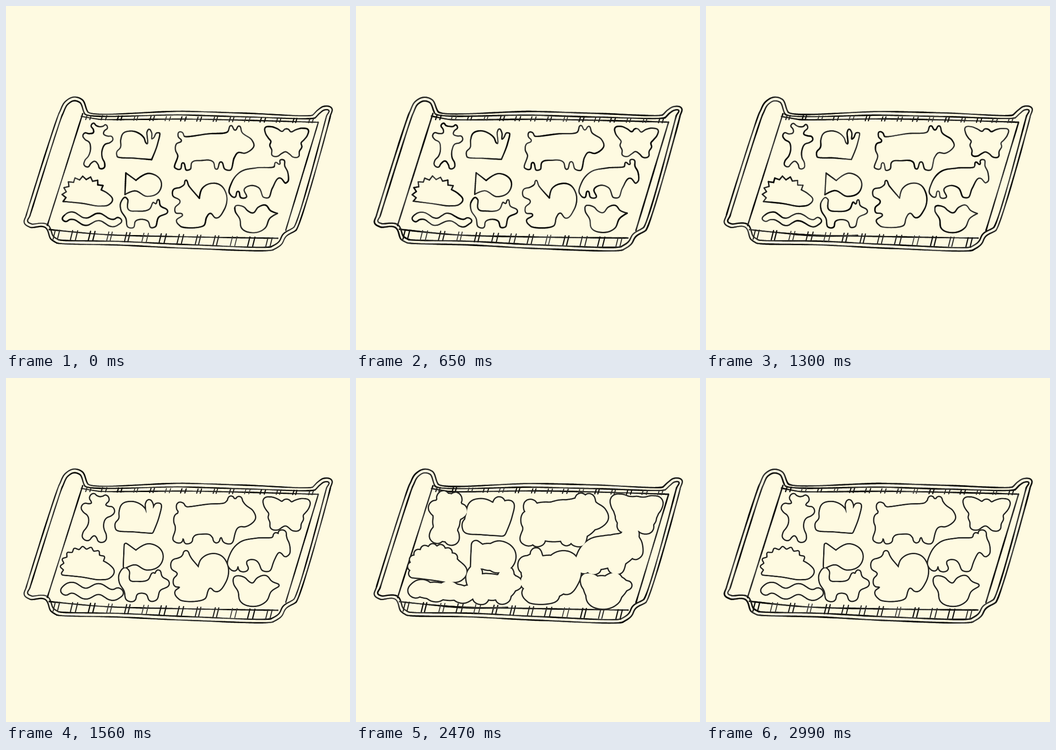
These frames come from a looping animation (749x748 px, 3120 ms). An HTML page with a canvas:

```html
<!DOCTYPE html>
<html lang="en">
<head>
<meta charset="utf-8">
<title>Biscuit tray</title>
<style>
html, body { margin: 0; width: 100%; height: 100%; overflow: hidden; background: #fefae1; }
canvas { display: block; width: 749px; height: 748px; }
</style>
</head>
<body>
<canvas id="stage" width="749" height="748"></canvas>
<script>
const ctx = document.getElementById('stage').getContext('2d');
const PAPER = '#fefae1', INK = '#252523', STEP = 130, STEPS = 24;

// Key points are "x,y"; a trailing "!" marks a sharp corner.
const parse = text => text.split(' ').map(s => {
  const [x, y] = s.split(',').map(parseFloat);
  return { x, y, sharp: s.endsWith('!') };
});

// Half an outline, mirrored about an axis through (cx, cy).
function mirror(cx, cy, tilt, half) {
  const c = Math.cos(tilt), s = Math.sin(tilt);
  const place = side => ({ x, y }) => ({ x: cx + side * x * c - y * s, y: cy + side * x * s + y * c });
  const pts = parse(half);
  return [...pts.map(place(1)), ...pts.slice(1, -1).reverse().map(place(-1))];
}

function hedgehog() {
  const spikes = Array.from({ length: 18 }, (_, i) => {
    const a = Math.PI * (0.9 + i * 0.058), r = i % 2 ? 0.83 : 1;
    return { x: 170 + 48 * r * Math.cos(a), y: 412 + 42 * r * Math.sin(a), sharp: true };
  });
  return [...spikes, ...parse('222,408 232,422 224,432 205,435 165,429')];
}

function worm() {
  const side = dy => Array.from({ length: 13 }, (_, i) => {
    const x = 130 + i * 9.5;
    return { x, y: 464 - 6 * Math.cos((x - 144) * 0.108) + (x - 190) * 0.05 + dy };
  });
  return [...side(-8), { x: 252, y: 467 }, ...side(8).reverse(), { x: 123, y: 464 }];
}

const biscuits = [
  mirror(198, 302, 0.13, '0,-40 8,-42 13,-46 18,-40 12,-32 11,-26 20,-22 30,-22 33,-16 28,-9 17,-3 13,8 15,26 22,38 22,47 13,50 8,42 0,36'),
  mirror(610, 290, 0.05, '0,-23 4,-22 9,-17 20,-22 35,-26 47,-23 46,-12 38,0 33,6 35,14 30,25 29,36 18,38 8,31 0,27'),
  hedgehog(),
  worm(),
  // rabbit, pig, fish
  parse('306,299 300,286 288,276 270,272 255,277 250,290 249,308 241,318 242,327 280,331 317,334! 330,300 334,276 328,276 322,286 318,289 317,275 311,268 307,274'),
  parse('388,283 384,275 377,274 375,284 382,293 371,300 369,313 374,325 368,352 379,355 385,341 393,357 401,355 405,340 425,336 451,339 458,355 468,339 477,355 488,357 497,330 505,319 520,320 540,303 535,291 514,275 507,261 499,270 490,260 483,273 440,278'),
  parse('261,363! 283,379! 312,364 338,383 333,404 308,414 280,402 259,410!'),
  // fox, squirrel
  parse('584,349 545,352 510,361 491,385 487,408 498,416 505,403 512,417 523,416 519,398 530,391 550,395 561,416 571,417 580,396 597,374 609,385 614,381 613,360 607,348 605,335 597,335 596,344 587,340'),
  parse('388,388 391,379 398,391 421,418! 427,397 445,386 466,389 479,407 475,443 457,461 444,451 437,459 432,476 380,479 371,467 384,453 369,449 368,439 379,425 363,412 364,400 380,394'),
  // dog, bird
  parse('250,427 260,416 265,421 267,443 285,446 313,441 321,427 326,430 331,421 336,434 352,446 332,460 325,480 316,482 309,468 282,468 277,482 266,481 261,462 250,443'),
  parse('499,436 518,437 526,445 537,450 550,437 565,433 576,445 591,451! 575,461 564,483 537,493 513,483 509,463 499,446')
];

const rim = parse('178,230 390,229 520,233 668,237 679,226 693,218 709,222 706,240 631,488 609,502 600,518 582,530 400,527 250,520 110,515 98,507 86,482 52,481 40,472 44,455 116,232 130,207 148,198 165,203');
const floorLines = ['164,240 200,246 400,246 680,253', '94,486 200,496 400,502 592,505', '167,234 90,477', '680,253 609,488'].map(parse);

// Small redraw differences between the three hand drawings.
const wobble = (pts, k) => pts.map((p, i) => ({
  x: p.x + (k && Math.sin(i * 12.9 + k * 7.3)) * 0.6,
  y: p.y + (k && Math.sin(i * 8.1 + k * 4.7 + 2)) * 0.6,
  sharp: p.sharp
}));

const gap = (a, b) => Math.hypot(b.x - a.x, b.y - a.y);

// Unit tangent of a curve through a, p, b; the nearer neighbour counts more.
function tangent(a, p, b) {
  const la = gap(a, p) || 1, lb = gap(p, b) || 1;
  const x = (p.x - a.x) / la * lb + (b.x - p.x) / lb * la;
  const y = (p.y - a.y) / la * lb + (b.y - p.y) / lb * la;
  const d = Math.hypot(x, y) || 1;
  return { x: x / d, y: y / d };
}

function inset(pts, by) {
  const n = pts.length;
  return pts.map((p, i) => {
    const t = tangent(pts[(i + n - 1) % n], p, pts[(i + 1) % n]);
    return { x: p.x - t.y * by, y: p.y + t.x * by };
  });
}

// Smooth curve through the points, as a dense polyline.
function flatten(pts, closed) {
  const n = pts.length, out = [];
  const at = i => closed ? pts[(i + n) % n] : pts[Math.max(0, Math.min(n - 1, i))];
  for (let i = 0; i < (closed ? n : n - 1); i++) {
    const [z, a, b, c] = [-1, 0, 1, 2].map(d => at(i + d)), len = gap(a, b);
    const reach = (p, other) => p.sharp ? 0 : 0.35 * Math.min(len, 1.5 * gap(p, other));
    const ta = tangent(z, a, b), tb = tangent(a, b, c), ha = reach(a, z), hb = reach(b, c);
    const steps = Math.max(2, Math.ceil(len / 3));
    for (let j = 0; j < steps; j++) {
      const t = j / steps, u = 1 - t;
      const mix = d => u * u * u * a[d] + 3 * u * u * t * (a[d] + ta[d] * ha)
        + 3 * u * t * t * (b[d] - tb[d] * hb) + t * t * t * b[d];
      out.push({ x: mix('x'), y: mix('y') });
    }
  }
  if (!closed) out.push(pts[n - 1]);
  return out;
}

// Pencil line whose weight and tone drift along the way.
function ink(line, closed, seed, width = 2.9) {
  ctx.lineCap = 'round';
  for (let i = closed ? 0 : 1; i < line.length; i++) {
    const a = line[(i || line.length) - 1], b = line[i];
    const drift = Math.sin(i * 0.09 + seed * 2.7) + 0.6 * Math.sin(i * 0.31 + seed * 5.1);
    const tone = Math.round(38 + 17 * drift);
    ctx.strokeStyle = `rgb(${tone},${tone},${tone - 3})`;
    ctx.lineWidth = width - 0.25 * drift;
    ctx.beginPath();
    ctx.moveTo(a.x, a.y);
    ctx.lineTo(b.x, b.y);
    ctx.stroke();
  }
}

function drawTicks({ x0, step, count, y0, slope, height, pair, lean }, k) {
  for (let i = 0; i < count; i++) {
    for (const dx of [0, pair]) {
      const x = x0 + i * step + dx + Math.sin(i * 5 + k * 3 + dx), y = y0 + slope * (x - x0);
      ink([{ x: x + lean, y }, { x: x - lean, y: y + height }], false, i + k, 2.4);
    }
  }
}

function drawTray(k) {
  const width = 2.7 + 0.2 * k;
  [rim, inset(rim, 8)].forEach((pts, i) => ink(flatten(wobble(pts, k), true), true, i + k, width));
  floorLines.forEach((pts, i) => ink(flatten(wobble(pts, k), false), false, i * 1.7 + k, width));
  drawTicks({ x0: 175, step: 34.6, count: 15, y0: 238, slope: 0.014, height: 9, pair: 8, lean: 1.5 }, k);
  drawTicks({ x0: 105, step: 38.6, count: 13, y0: 487, slope: 0.036, height: 20, pair: 9, lean: 2.5 }, k);
  if (k === 1) ink(flatten(parse('190,496 218,498 250,500 330,499'), false), false, 4, 3.8);
}

function soften(line, reach) {
  const n = line.length, size = 2 * reach + 1;
  return line.map((_, i) => {
    let x = 0, y = 0;
    for (let j = -reach; j <= reach; j++) {
      const p = line[(i + j + n) % n];
      x += p.x / size;
      y += p.y / size;
    }
    return { x, y };
  });
}

// Puffs the biscuits up: hollows fill in, edges spread, neighbours fuse.
function drawPuffed(rise) {
  const shapes = [];
  for (const pts of biscuits) {
    const line = flatten(pts, true);
    const reach = Math.round(line.length * 0.02 * rise);
    const layers = [line, soften(line, reach)];
    if (rise > 1) layers.push(soften(line, 2 * reach));
    for (const layer of layers) {
      const path = new Path2D();
      layer.forEach(p => path.lineTo(p.x, p.y));
      path.closePath();
      shapes.push(path);
    }
  }
  const spread = 2.8 + 4.2 * rise;
  ctx.lineJoin = 'round';
  for (const [color, width] of [[INK, spread + 3], [PAPER, spread - 2.6]]) {
    ctx.strokeStyle = ctx.fillStyle = color;
    ctx.lineWidth = width;
    for (const path of shapes) {
      ctx.stroke(path);
      ctx.fill(path);
    }
  }
}

function render(step) {
  const k = step % 3;
  const rise = step < 12 ? 0 : Math.min(step - 11, 24 - step, 4);
  ctx.fillStyle = PAPER;
  ctx.fillRect(0, 0, 749, 748);
  drawTray(k);
  if (rise) drawPuffed(rise);
  else biscuits.forEach((pts, i) => ink(flatten(wobble(pts, k), true), true, i + k * 3.3));
}

const start = performance.now();
let shown = -1;
function tick() {
  const step = Math.floor((performance.now() - start) / STEP) % STEPS;
  if (step !== shown) render(shown = step);
  requestAnimationFrame(tick);
}
tick();
</script>
</body>
</html>
```
